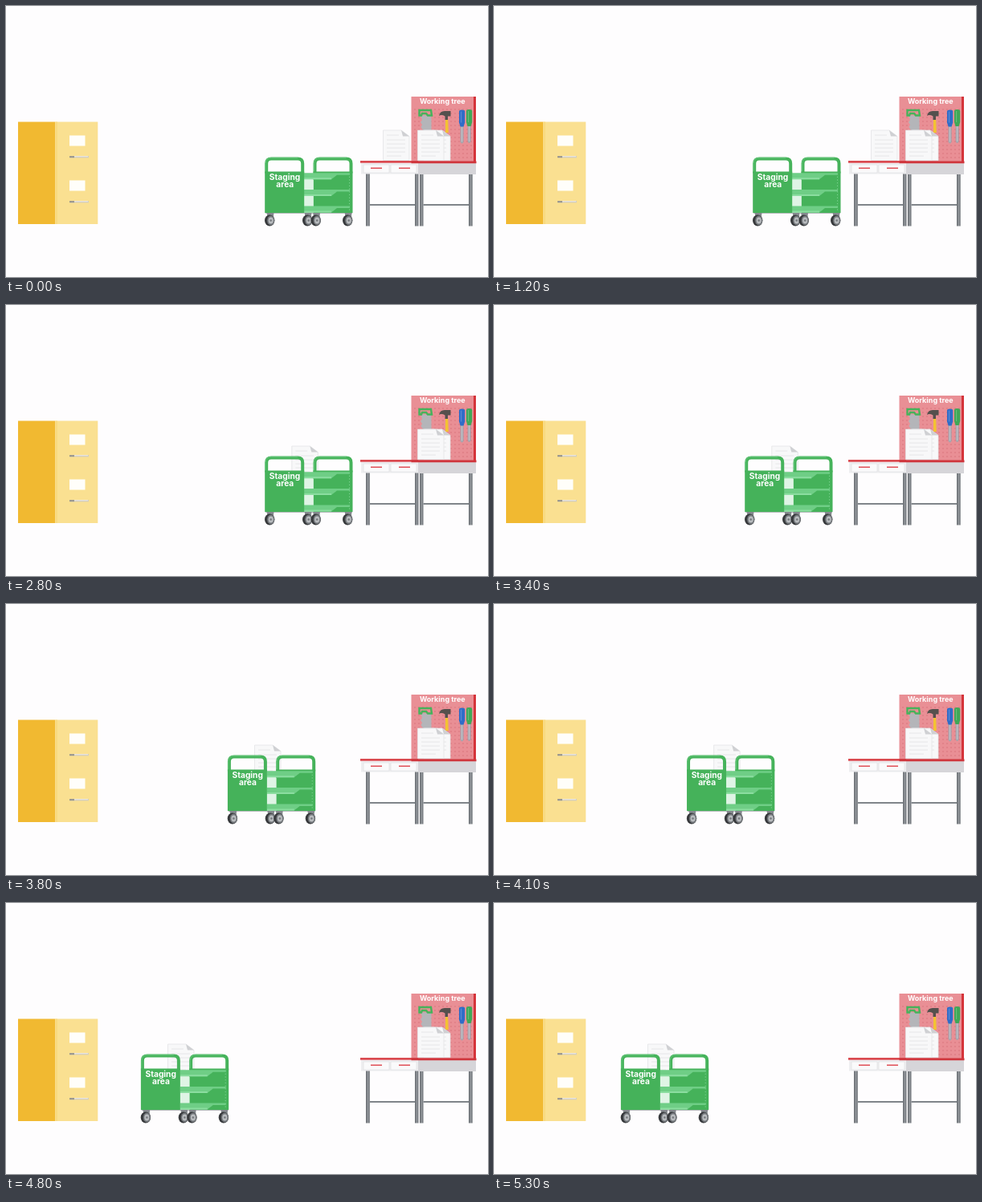
An HTML page for the animation above (8000 ms loop, 600x338 px).

```html
<!DOCTYPE html>
<html lang="en">
<head>
<meta charset="utf-8">
<title>Staging a file</title>
<style>
  html, body { margin: 0; width: 100%; height: 100%; overflow: hidden; background: #fefdfe; }
  svg { display: block; width: 100vw; height: 100vh; }
  text { font-family: Inter, "Open Sans", sans-serif; font-weight: 700; fill: #fff; text-anchor: middle; }
</style>
</head>
<body>
<svg viewBox="0 0 600 338">
  <defs>
    <pattern id="holes" x="507" y="127" width="5" height="5" patternUnits="userSpaceOnUse">
      <circle cx="2" cy="2" r=".7" fill="#d26a73"/>
    </pattern>
    <linearGradient id="leg">
      <stop offset="0" stop-color="#63676c"/>
      <stop offset=".5" stop-color="#92969b"/>
      <stop offset="1" stop-color="#6b7075"/>
    </linearGradient>
    <g id="page">
      <path d="M-16.500 -19H6L16 -11.500V18.500H-16.500Z" fill="#f8f8f9" stroke="#e4e4e6" stroke-width=".8"/>
      <path d="M6 -19L8 -11.500H16Z" fill="#cfd0d3"/>
      <path d="M-12 -13H3M-12 -7H11M-12 -2H11M-12 3H11M-12 8H11M-12 13H6" stroke="#e6e6e8"/>
    </g>
    <g id="wheel">
      <path d="M-4 -10H5L4 0H-2Z" fill="#85898e"/>
      <ellipse cx="-.3" rx="6.2" ry="7" fill="#37393c"/>
      <ellipse cx="1.2" rx="4.6" ry="5.900" fill="#75797d"/>
      <ellipse cx="1.2" rx="3" ry="4" fill="#b9bcbf"/>
      <circle cx="1.2" r="1.3" fill="#75797d"/>
    </g>
    <g id="frame" fill="none">
      <path d="M2 20V8Q2 2 8 2H41Q47 2 47 8V20" stroke="#46b35b" stroke-width="4"/>
      <path d="M1 18V8Q1 1 8 1H41" stroke="#6bcc83" stroke-width=".8"/>
      <path d="M0 18H49V69.500H0Z" fill="#45b25a"/>
    </g>
    <g id="shelf">
      <path d="M0 0H57V2.500H41L34 8H0Z" fill="#6fce86"/>
      <path d="M0 6H34V8H0Z" fill="#8bdda0"/>
    </g>
    <g id="drawer">
      <path d="M79 161.500H98.500V174.500H79Z" fill="#fffefa"/>
      <path d="M80 188.200H103" stroke="#d2cdbf" stroke-width="2.4"/>
      <path d="M79 188.200H85" stroke="#96938b" stroke-width="2"/>
      <path d="M85 187.600H102" stroke="#f1eee6" stroke-width=".9"/>
    </g>
    <g id="driver">
      <path d="M-2 19H2V40Q0 44 -2 40Z" fill="#a5a4ad"/>
      <path d="M0 21V40" stroke="#cbc7cd"/>
      <path d="M-3.600 2Q-3.600 0 0 0Q3.600 0 3.600 2V16L2 21H-2L-3.600 16Z"/>
      <path d="M-1 2V16" stroke="#fff" stroke-opacity=".25"/>
    </g>
  </defs>

  <!-- cabinet -->
  <path d="M15 144.500H61.500V272H15Z" fill="#f1b931"/>
  <path d="M61.500 144.500H114.300V272H61.500Z" fill="#fae091"/>
  <path d="M61.500 144.500H64V272H61.500Z" fill="#f8da80"/>
  <use href="#drawer"/>
  <use href="#drawer" y="56"/>

  <!-- pegboard and tools -->
  <path d="M504.500 113H585V195H504.500Z" fill="#e98f95"/>
  <path d="M506 126H582V193H506Z" fill="url(#holes)"/>
  <path d="M582 113H585V195H582Z" fill="#d5343b"/>
  <text x="543.3" y="122.3" font-size="9">Working tree</text>
  <path d="M516 136L529.500 137V158H519L518.500 154L516.500 151L518 148L516 145L518 142Z" fill="#b4b5b9"/>
  <path d="M514.500 130H529L530 136.500H525L523 134H518L517 136.500H514.500Z" fill="none" stroke="#46b35b" stroke-width="2.4"/>
  <path d="M547 141H550.200L550.800 158H547Z" fill="#f3c232"/>
  <path d="M539 137Q540 131 546 131H553.500V137.500H550V142H546.500V137.500Q542 135 539 137Z" fill="#55504d"/>
  <use href="#driver" x="567.6" y="129.500" fill="#2f6cc8"/>
  <use href="#driver" x="576.600" y="129" fill="#3fa857"/>

  <!-- desk -->
  <g fill="url(#leg)">
    <path d="M448 209H452.800V274.500H448Z"/>
    <path d="M509 209H513.500V274.500H509Z"/>
    <path d="M515 209H519.500V274.500H515Z"/>
    <path d="M576 209H580.700V274.500H576Z"/>
  </g>
  <path d="M453 248H509M519.500 248H576" stroke="#80858a" stroke-width="1.800"/>
  <path d="M442 196H513V209.500H442Z" fill="#eeeef0"/>
  <path d="M445 198H477V208H445ZM479 198H511V208H479Z" fill="#fafafb" stroke="#e0e0e3" stroke-width=".7"/>
  <path d="M454 202.200H468M489 202.200H503" stroke="#df4f56" stroke-width="1.500"/>
  <path d="M513 196H585V210H513Z" fill="#d6d5d9"/>
  <path d="M441 193H513V195.800H441Z" fill="#da4a50"/>
  <path d="M504.500 193.500H585.500V196.300H504.500Z" fill="#cf363d"/>
  <use href="#page" x="537" y="174"/>
  <use href="#page" x="529" y="174"/>

  <use id="doc" href="#page"/>

  <g id="cart">
    <path d="M323 258H431V259H323Z" fill="#b5babb"/>
    <use href="#wheel" x="328.500" y="267.500"/>
    <use href="#wheel" x="375.500" y="267.500"/>
    <use href="#wheel" x="386" y="267.500"/>
    <use href="#wheel" x="425.500" y="267.500"/>
    <use href="#frame" x="382.500" y="188.600"/>
    <path d="M427.500 209V256" stroke="#7fd494" stroke-dasharray="1.2 2.500"/>
    <path d="M371 217H383V258H371Z" fill="#d4f2dc" opacity=".75"/>
    <use href="#shelf" x="371" y="208.300"/>
    <use href="#shelf" x="371" y="229"/>
    <use href="#shelf" x="371" y="249.500"/>
    <use href="#frame" x="322.200" y="188.600"/>
    <text x="347" y="217.200" font-size="10.200">Staging</text>
    <text x="347.300" y="226.200" font-size="10.200">area</text>
  </g>
</svg>
<script>
  const LOOP = 8000, STEP = 100;
  const doc = document.getElementById('doc');
  const cart = document.getElementById('cart');
  const start = performance.now();

  // eased progress from 0 to 1 between two times
  function ease(t, from, to) {
    const p = Math.min(1, Math.max(0, (t - from) / (to - from)));
    return p * p * (3 - 2 * p);
  }

  const curve = (s, a, b, c) => (1 - s) * (1 - s) * a + 2 * s * (1 - s) * b + s * s * c;
  const move = (el, x, y) => el.setAttribute('transform', `translate(${x} ${y})`);

  function draw() {
    const now = Math.max(0, performance.now() - start) % LOOP;
    const t = Math.floor(now / STEP) * STEP;
    const hop = ease(t, 1400, 2050);
    const roll = -164.3 * ease(t, 3100, 5100);
    move(doc, curve(hop, 486, 428, 372.3) + roll, curve(hop, 174, 100, 195));
    move(cart, roll, 0);
    requestAnimationFrame(draw);
  }
  draw();
</script>
</body>
</html>
```
